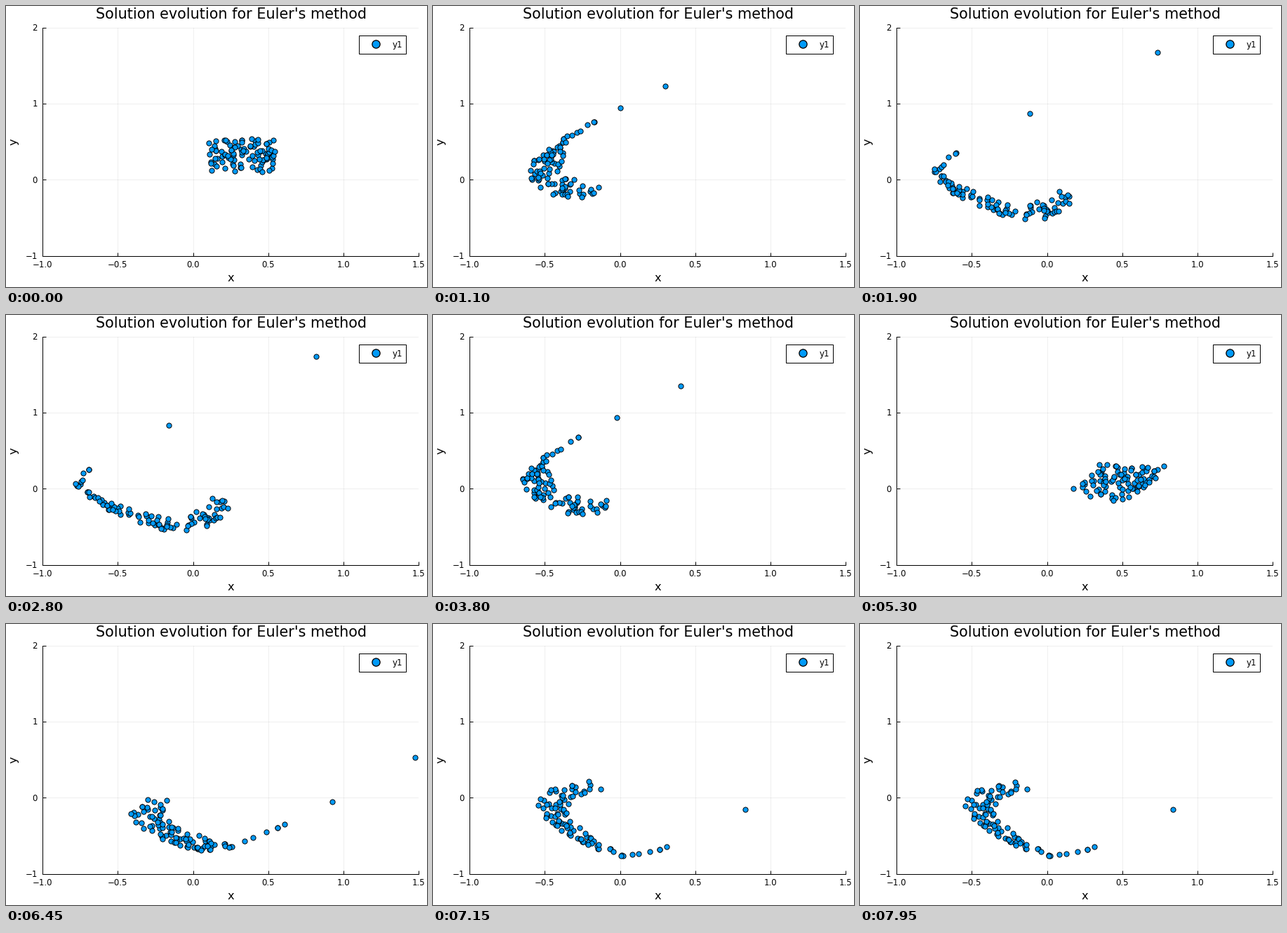
A matplotlib script for the animation above (8000 ms loop, 600 px wide and 400 px high).

```python
import numpy as np
import matplotlib.pyplot as plt
from matplotlib.animation import FuncAnimation
from matplotlib.patches import Rectangle

W, H, DPI = 600, 400, 100
LEFT, RIGHT, TOP, BOTTOM = 52.3, 587.8, 30.7, 355.7
FRAMES, INTERVAL = 160, 50
COUNT = 100
PT = 72 / DPI                      # points per pixel
BLUE = "#009AF9"

plt.rcParams["font.family"] = "DejaVu Sans"


def start_cloud():
    """Random square of dots, with a few placed near its corners."""
    corners = [(0.536, 0.517), (0.505, 0.490), (0.488, 0.472), (0.487, 0.473),
               (0.431, 0.528), (0.391, 0.543), (0.125, 0.123), (0.103, 0.485),
               (0.110, 0.332), (0.544, 0.370), (0.460, 0.105), (0.528, 0.218),
               (0.120, 0.215), (0.280, 0.110)]
    rng = np.random.default_rng(4)
    fill = rng.uniform(0.115, 0.535, (2 * COUNT, 2))
    fill = fill[fill.sum(axis=1) < 0.94]
    return np.vstack([fill[:COUNT - len(corners)], corners])


def flow(p):
    """Steady cellular velocity field."""
    return np.column_stack([-np.sin(np.pi * p[:, 1]), np.sin(np.pi * p[:, 0])])


def advance(p, span, steps=4):
    h = span / steps
    for _ in range(steps):
        a = flow(p)
        b = flow(p + h / 2 * a)
        c = flow(p + h / 2 * b)
        d = flow(p + h * c)
        p = p + h / 6 * (a + 2 * b + 2 * c + d)
    return p


def phase(n):
    """Signed distance along the flow; it swings back and forth."""
    return 1.59 * np.sin(np.pi * max(n - 0.8, 0) / 100)


states = [start_cloud()]
for n in range(1, FRAMES):
    states.append(advance(states[-1], phase(n) - phase(n - 1)))

fig = plt.figure(figsize=(W / DPI, H / DPI), dpi=DPI, facecolor="white")
ax = fig.add_axes([LEFT / W, 1 - BOTTOM / H, (RIGHT - LEFT) / W, (BOTTOM - TOP) / H])
ax.set(xlim=(-1, 1.5), ylim=(-1, 2))
xticks, yticks = np.arange(-1, 1.6, 0.5), np.arange(-1, 3)
ax.set_xticks(xticks)
ax.set_yticks(yticks)
ax.set_axisbelow(True)
ax.grid(color="black", alpha=0.09, lw=0.5)
ax.tick_params(direction="in", length=5 * PT, width=PT,
               labelbottom=False, labelleft=False)
ax.spines[["top", "right"]].set_visible(False)
ax.spines[["left", "bottom"]].set_linewidth(PT)


def label(x, y, s, px, ha="center", rotation=0):
    fig.text(x / W, 1 - y / H, s.replace("-", "\u2212"), fontsize=px * PT, ha=ha,
             va="baseline", rotation=rotation, rotation_mode="anchor")


label(320.5, 18.5, "Solution evolution for Euler's method", 20.8)
for v in xticks:
    label(LEFT + (v + 1) / 2.5 * (RIGHT - LEFT), 371.5, f"{v:.1f}", 11.8)
for v in yticks:
    label(45, TOP + (2 - v) / 3 * (BOTTOM - TOP) + 4.2, f"{v}", 11.8, "right")
label(320.3, 392.2, "x", 16.3)
label(15.6, 193, "y", 16.3, rotation=90)

dot = dict(marker="o", ls="", mfc=BLUE, mec="black", snap=False)
dots, = ax.plot([], [], ms=7.2 * PT, mew=0.95 * PT, zorder=3, **dot)

# Legend
fig.add_artist(Rectangle((503.2 / W, 1 - 67.7 / H), 67 / W, 26 / H,
                         transform=fig.transFigure, fc="white", ec="black", lw=PT))
fig.add_artist(plt.Line2D([527.2 / W], [1 - 54.4 / H],
                          ms=11.2 * PT, mew=1.3 * PT, **dot))
label(550.7, 58.8, "y1", 11.8, "left")


def draw(n):
    dots.set_data(*states[n].T)
    return dots,


anim = FuncAnimation(fig, draw, frames=FRAMES, interval=INTERVAL,
                     init_func=lambda: draw(0), repeat=True, repeat_delay=0)
plt.show()
```
